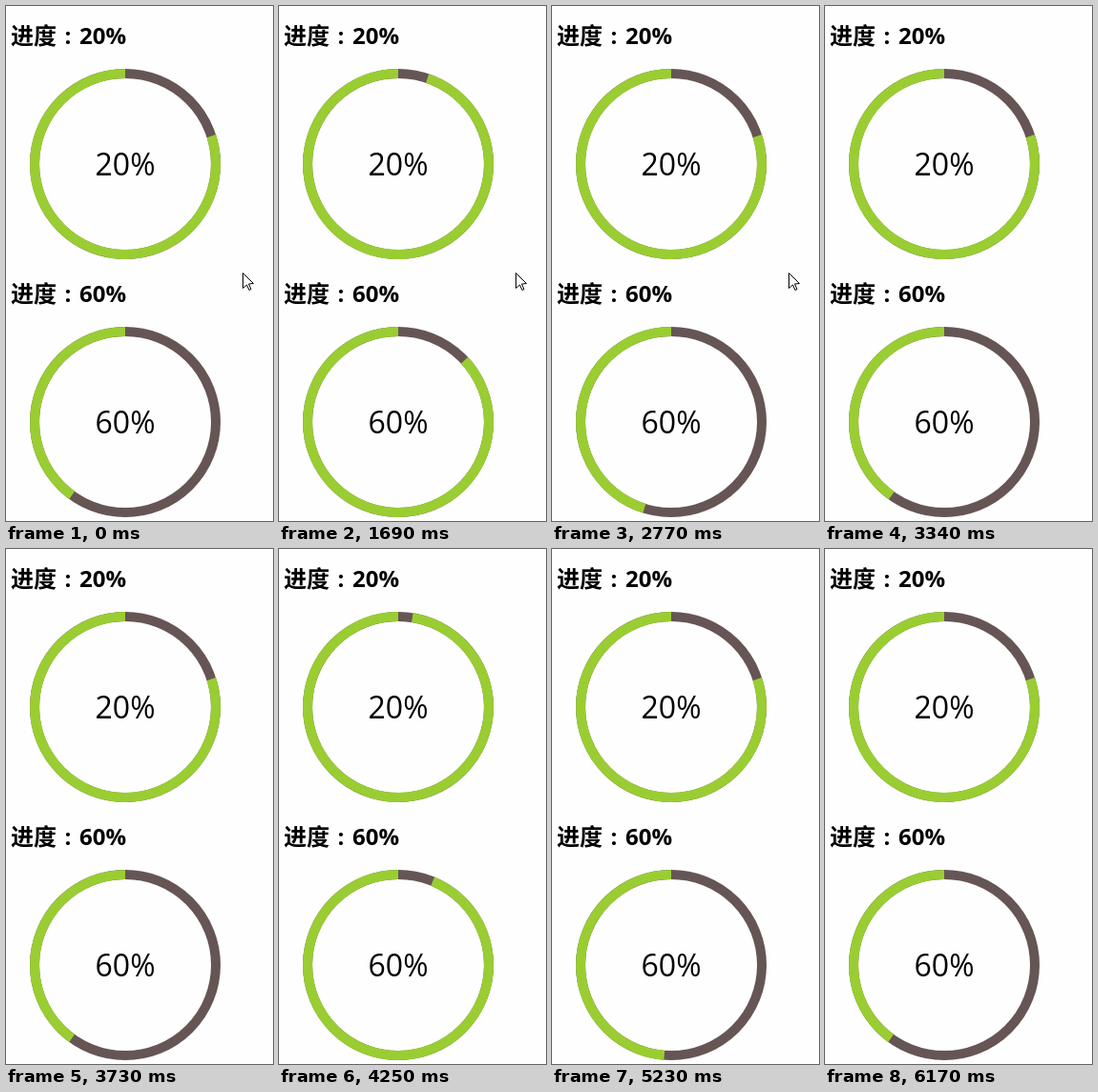
Recreate the animation shown at these times as an HTML page with a canvas. Size 280 by 541 pixels, loop 6.31 s.

```html
<!DOCTYPE html>
<html lang="zh-CN">
<head>
<meta charset="utf-8">
<style>
  html, body { margin: 0; width: 100%; height: 100%; overflow: hidden; background: #fefefe; }
  canvas { display: block; }
</style>
</head>
<body>
<canvas id="stage" width="280" height="541"></canvas>
<script>
const ctx = document.getElementById('stage').getContext('2d');
const LOOP = 6310;
const CURSOR_GONE = 3190;
const SECOND_RUN = 4250;
const LEFT_DELAY = 982;
const FONT = '"Open Sans", "Noto Sans", "Noto Sans CJK SC", sans-serif';

// The picture only refreshes at these moments (ms).
const TICKS = [
  0, 1690, 1840, 1960, 2080, 2230, 2350, 2500, 2630, 2770, 2920, 3040, 3190, 3340, 3490,
  4250, 4370, 4490, 4640, 4770, 4920, 5080, 5230, 5350, 5470, 5620, 5770, 5920, 6050, 6170
];

const bezier = (a, b, s) => 3 * (1 - s) ** 2 * s * a + 3 * (1 - s) * s * s * b + s ** 3;

// The CSS "ease" curve: cubic-bezier(.25, .1, .25, 1)
function ease(x) {
  if (x <= 0) return 0;
  if (x >= 1) return 1;
  let low = 0, high = 1;
  for (let i = 0; i < 24; i++) {
    const mid = (low + high) / 2;
    if (bezier(0.25, 0.25, mid) < x) low = mid; else high = mid;
  }
  return bezier(0.1, 1, low);
}

// The right half turns first, the left half follows.
function sweep(percent, elapsed) {
  const degrees = percent * 3.6;
  const right = Math.min(degrees, 180);
  return right * ease(elapsed / 1000) +
    (degrees - right) * ease((elapsed - LEFT_DELAY) / 1000);
}

function arc(y, from, to, color) {
  const rad = d => (d - 90) * Math.PI / 180;
  ctx.beginPath();
  ctx.arc(125, y, 95, rad(from), rad(to));
  ctx.lineWidth = 10;
  ctx.strokeStyle = color;
  ctx.stroke();
}

function text(str, x, y, font, align) {
  ctx.font = `${font} ${FONT}`;
  ctx.textAlign = align;
  ctx.fillStyle = '#000';
  ctx.fillText(str, x, y);
}

function drawProgress(top, percent, elapsed) {
  text('进度', 5, top + 40, 'bold 24px', 'left');
  text(':', 65, top + 40, 'bold 24px', 'center');
  text(percent + '%', 77, top + 40, 'bold 24px', 'left');

  arc(top + 166, 0, 360, '#655');
  arc(top + 166, sweep(percent, elapsed), 360, '#9acd32');
  text(percent + '%', 125, top + 178, '32px', 'center');
}

function drawCursor(x, y) {
  const outline = [[0, 0], [0, 16], [4, 12.5], [6.5, 18], [8.5, 17], [6, 11.5], [11, 11]];
  ctx.beginPath();
  outline.forEach(([dx, dy]) => ctx.lineTo(x + dx + 0.5, y + dy + 0.5));
  ctx.closePath();
  ctx.fillStyle = '#fff';
  ctx.fill();
  ctx.lineWidth = 1;
  ctx.strokeStyle = '#000';
  ctx.stroke();
}

function draw(now) {
  const time = now % LOOP;
  const tick = TICKS.filter(t => t <= time).pop();
  const start = tick < TICKS[1] ? -LOOP : tick < SECOND_RUN ? 1505 : 4132;

  ctx.fillStyle = '#fefefe';
  ctx.fillRect(0, 0, 280, 541);
  drawProgress(0, 20, tick - start);
  drawProgress(271, 60, tick - start);
  if (time < CURSOR_GONE) drawCursor(248, 280);
}

const origin = performance.now();
function frame() {
  draw(performance.now() - origin);
  requestAnimationFrame(frame);
}
frame();
</script>
</body>
</html>
```
